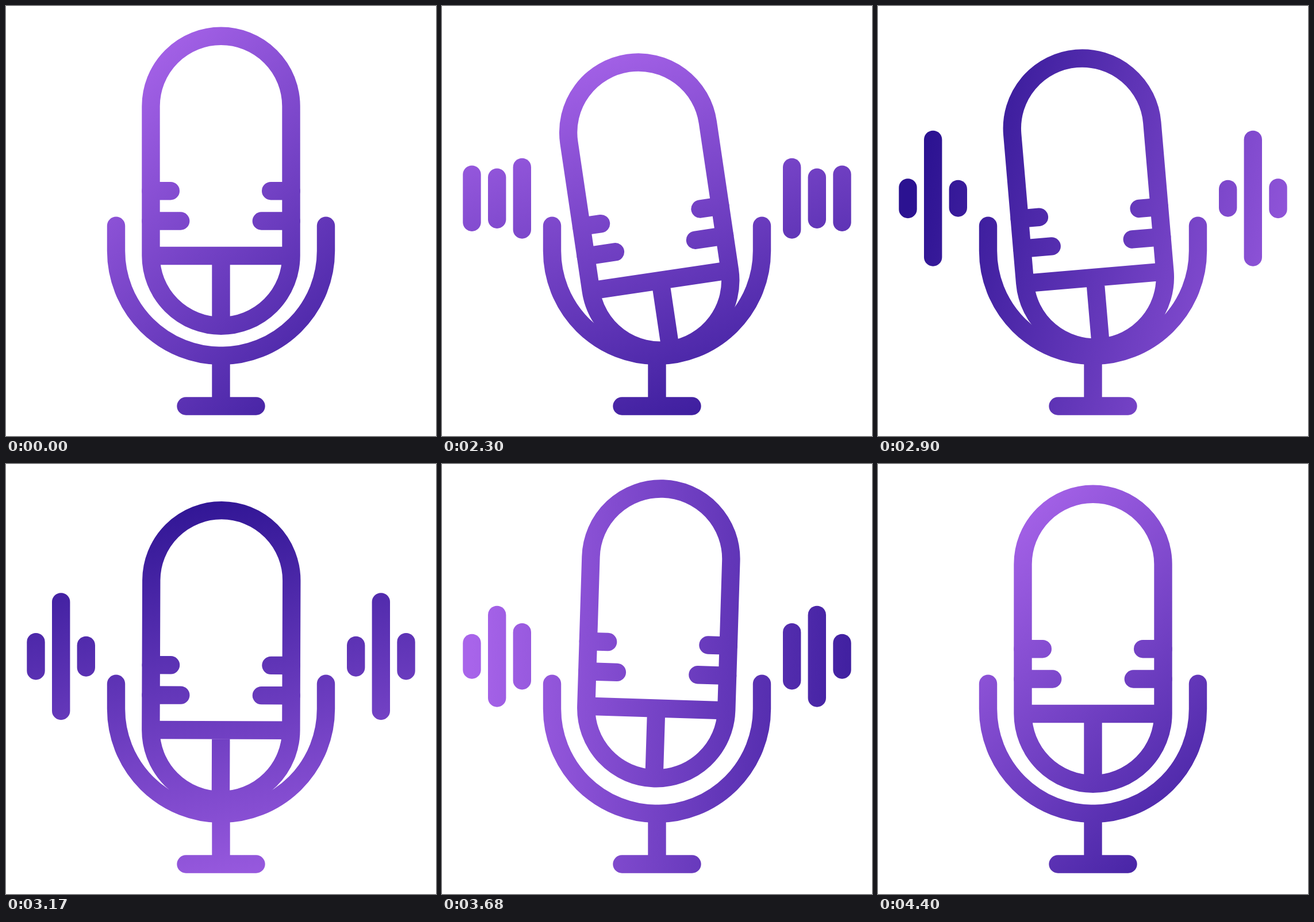
Animation of 748 by 748 pixels, one loop 4430 ms. Source, as an HTML page:

```html
<!DOCTYPE html>
<html lang="en">
<head>
<meta charset="utf-8">
<title>Microphone</title>
<style>
  html, body { margin: 0; width: 100%; height: 100%; overflow: hidden; background: #fff; }
  svg { display: block; width: 100vw; height: 100vh; }
</style>
</head>
<body>
<svg viewBox="0 0 748 748">
  <defs>
    <linearGradient id="shade" gradientUnits="userSpaceOnUse" x1="-400" y1="0" x2="400" y2="0">
      <stop offset="0" stop-color="#a864ea"/>
      <stop offset="1" stop-color="#2b1291"/>
    </linearGradient>
    <mask id="icon" maskUnits="userSpaceOnUse" x="0" y="0" width="748" height="748">
      <g fill="none" stroke="#fff" stroke-width="31.4" stroke-linecap="round">
        <path d="M191.5 382.3V426A182.5 182.5 0 0 0 556.5 426V382.3"/>
        <path d="M374 608.4V696M313 696H435"/>
        <g id="head">
          <rect x="252" y="52.3" width="244" height="504" rx="122"/>
          <path stroke-linecap="butt" d="M252 434.5H496M374 434.5V556"/>
          <path d="M252 321.7H286.3M252 374H303.7M496 321.7H460.7M496 374H444.3"/>
        </g>
      </g>
      <g id="bars" fill="#fff"></g>
    </mask>
  </defs>
  <rect width="748" height="748" fill="url(#shade)" mask="url(#icon)"/>
</svg>
<script>
const LOOP = 4430, REST = 2000, STEP = 30, SPAN = 2400, SLACK = 4;
const MID_Y = 334.7, BAR = 31.4;
const byId = id => document.getElementById(id);
const shade = byId('shade'), head = byId('head'), bars = byId('bars');

// Swings from one turning point to the next with a sine ease.
const swing = (times, values) => t => {
  let i = 0;
  while (i < times.length - 2 && t > times[i + 1]) i++;
  const u = (t - times[i]) / (times[i + 1] - times[i]);
  return values[i] + (values[i + 1] - values[i]) * (1 - Math.cos(Math.PI * u)) / 2;
};

const lift = swing([-40, 330, 700, 950, 1600, 1920, SPAN], [0, 44, -11, 43, -14, 17, 0]);
const tilt = swing([0, 270, 550, 910, 1430, 1920, SPAN], [0, -9, 11.2, -4.9, 5.3, -1.5, 0]);
const turn = t => 45 + 360 * (1 - (1 - (t / SPAN) ** 1.8) ** 2.85);

const beats = [STEP, 540, 900, 1440, 1920, SPAN];
const heights = [
  [39, 177, 69, 94, 62, BAR],
  [57, 144, 236, 206, 146, BAR],
  [46, 218, 64, 76, 155, BAR]
].map(levels => swing(beats, levels));

function makeBar(x) {
  const r = document.createElementNS('http://www.w3.org/2000/svg', 'rect');
  r.setAttribute('x', x - BAR / 2);
  r.setAttribute('width', BAR);
  r.setAttribute('rx', BAR / 2);
  bars.appendChild(r);
  return r;
}
const pairs = [52, 95.7, 139.3].map(x => [makeBar(x), makeBar(748 - x)]);

function draw(ms) {
  const t = Math.max(0, Math.floor((ms - REST + SLACK) / STEP)) * STEP;
  const moving = t > 0 && t < SPAN;
  const [dy, angle] = moving ? [lift(t), tilt(t)] : [0, 0];
  head.setAttribute('transform', `translate(0 ${dy}) rotate(${angle} 374 395)`);
  shade.setAttribute('gradientTransform', `translate(449 414) rotate(${turn(t)})`);
  bars.setAttribute('visibility', moving ? 'visible' : 'hidden');
  if (!moving) return;
  pairs.forEach((pair, i) => {
    const h = heights[i](t);
    for (const r of pair) {
      r.setAttribute('y', MID_Y - h / 2);
      r.setAttribute('height', h);
    }
  });
}

const begin = performance.now();
function tick() {
  draw((performance.now() - begin) % LOOP);
  requestAnimationFrame(tick);
}
tick();
</script>
</body>
</html>
```
